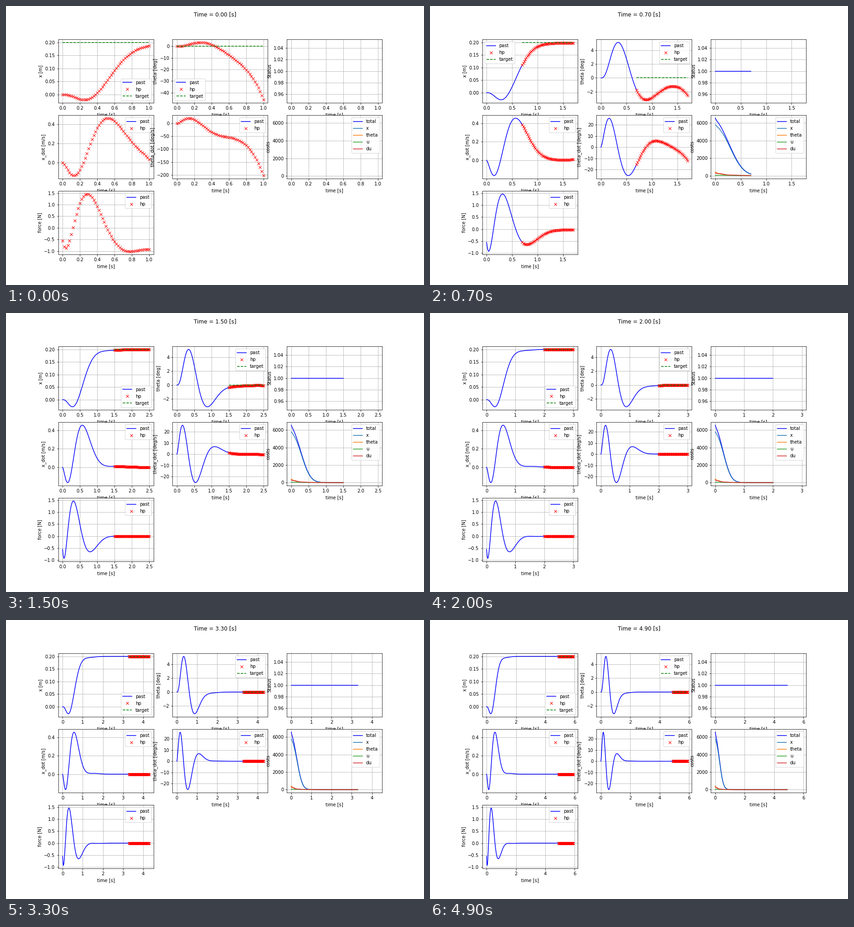
A matplotlib script that plays this animation: 917x611 px, repeating every 5000 ms.

```python
import numpy as np
import matplotlib.pyplot as plt
from matplotlib.animation import FuncAnimation

# Cart and pole: total mass, pole moment m*l, pole inertia, friction, gravity
MASS, MOMENT, INERTIA, FRICTION, GRAVITY = 0.7, 0.06, 0.024, 0.1, 9.81
DT, HORIZON, TARGET = 0.02, 50, 0.2
FRAMES, STEPS_PER_FRAME = 50, 5
W_X, W_THETA, W_U, W_DU = np.sqrt([5000, 100, 1, 250])


def deriv(state, force):
    _, theta, v, omega = state
    sin, cos = np.sin(theta), np.cos(theta)
    push = force - FRICTION * v + MOMENT * omega * omega * sin
    tip = MOMENT * GRAVITY * sin
    couple = MOMENT * cos
    det = MASS * INERTIA - couple * couple
    return (v, omega,
            (INERTIA * push - couple * tip) / det,
            (MASS * tip - couple * push) / det)


def step(state, force):
    """One explicit Euler step."""
    return [s + DT * slope for s, slope in zip(state, deriv(state, force))]


def rollout(state, forces):
    path = [list(state)]
    for force in forces.tolist():
        path.append(step(path[-1], force))
    return np.array(path)


def residual(path, forces, previous):
    return np.concatenate([W_X * (path[1:, 0] - TARGET),
                           W_THETA * path[1:, 1],
                           W_U * forces,
                           W_DU * np.diff(forces, prepend=previous)])


def jacobian(path, forces):
    # Complex-step derivative of all steps at once
    points = np.vstack([path[:-1].T, forces])[:, :, None]
    points = points + 1e-20j * np.eye(5)[:, None, :]
    slopes = np.array(step(points[:4], points[4])).imag / 1e-20
    sens = np.zeros((HORIZON + 1, 4, HORIZON))
    for k in range(HORIZON):
        sens[k + 1] = slopes[:, k, :4] @ sens[k]
        sens[k + 1][:, k] += slopes[:, k, 4]
    eye = np.eye(HORIZON)
    return np.vstack([W_X * sens[1:, 0], W_THETA * sens[1:, 1],
                      W_U * eye, W_DU * (eye - np.eye(HORIZON, k=-1))])


def plan(state, forces, previous):
    """Gauss-Newton solution of the horizon problem."""
    path = rollout(state, forces)
    res = residual(path, forces, previous)
    for _ in range(25):
        jac = jacobian(path, forces)
        move = -np.linalg.solve(jac.T @ jac, jac.T @ res)
        limit = res @ res * (1 + 1e-9)
        scale = 1.0
        while True:
            trial = forces + scale * move
            path = rollout(state, trial)
            res = residual(path, trial, previous)
            if res @ res <= limit or scale < 1e-3:
                break
            scale /= 2
        forces = trial
        if np.abs(move).max() < 1e-3:
            break
    return path, forces, (res ** 2).reshape(4, HORIZON).sum(axis=1)


def with_degrees(path, forces):
    """Columns: x, theta, x_dot, theta_dot, force."""
    data = np.column_stack([path, forces])
    data[:, [1, 3]] = np.degrees(data[:, [1, 3]])
    return data


def simulate():
    state, forces, previous = [0.0] * 4, np.zeros(HORIZON), 0.0
    states, applied, costs, plans = [], [], [], []
    for k in range((FRAMES - 1) * STEPS_PER_FRAME + 1):
        path, forces, cost = plan(state, forces, previous)
        states.append(state)
        applied.append(forces[0])
        costs.append([cost.sum(), *cost])
        if k % STEPS_PER_FRAME == 0:
            plans.append(with_degrees(path, np.append(forces, forces[-1])))
        previous = float(forces[0])
        state = [float(s) for s in step(state, previous)]
        forces = np.append(forces[1:], forces[-1])
    return with_degrees(np.array(states), applied), np.array(costs), plans


past, costs, plans = simulate()
times = np.arange(len(past)) * DT

fig = plt.figure(figsize=(917 / 72, 611 / 72), dpi=72)
title = fig.suptitle("Time = 0.00 [s]")


def panel(place, ylabel):
    ax = fig.add_subplot(3, 3, place)
    ax.set_xlabel("time [s]")
    ax.set_ylabel(ylabel)
    ax.grid(True)
    return ax


def add_line(ax, style, label=None):
    return ax.plot([], [], style, label=label)[0]


# place in the grid, label, data column, target
SIGNALS = [(1, "x [m]", 0, TARGET), (2, "theta [deg]", 1, 0.0),
           (4, "x_dot [m/s]", 2, None), (5, "theta_dot [deg/s]", 3, None),
           (7, "force [N]", 4, None)]
signals = []
for place, ylabel, column, target in SIGNALS:
    ax = panel(place, ylabel)
    lines = [add_line(ax, "b-", "past"), add_line(ax, "rx", "hp")]
    if target is not None:
        lines.append(add_line(ax, "g--", "target"))
    ax.legend(loc="best")
    signals.append((lines, column, target))

status_line = add_line(panel(3, "Status"), "b-")
cost_ax = panel(6, "costs")
cost_lines = [add_line(cost_ax, style, label) for style, label in
              zip(["b", "C0", "C1", "C2", "C3"],
                  ["total", "x", "theta", "u", "du"])]
cost_ax.legend(loc="best")

# Later panels cover the labels of earlier ones
for ax in fig.axes:
    ax.set_zorder(ax.get_subplotspec().num1)


def update(frame):
    count = frame * STEPS_PER_FRAME + 1
    now = frame * STEPS_PER_FRAME * DT
    seen = times[:count]
    ahead = now + np.arange(HORIZON + 1) * DT
    title.set_text(f"Time = {now:.2f} [s]")
    for lines, column, target in signals:
        lines[0].set_data(seen, past[:count, column])
        lines[1].set_data(ahead, plans[frame][:, column])
        if target is not None:
            lines[2].set_data(ahead, np.full(len(ahead), target))
    status_line.set_data(seen, np.ones(count))
    for i, line in enumerate(cost_lines):
        line.set_data(seen, costs[:count, i])
    span = ahead[-1]
    for ax in fig.axes:
        ax.relim()
        ax.autoscale_view(scalex=False)
        ax.set_xlim(-0.05 * span, 1.05 * span)
    return []


anim = FuncAnimation(fig, update, frames=FRAMES, interval=100,
                     init_func=lambda: update(0), repeat=True, repeat_delay=0)
plt.show()
```
